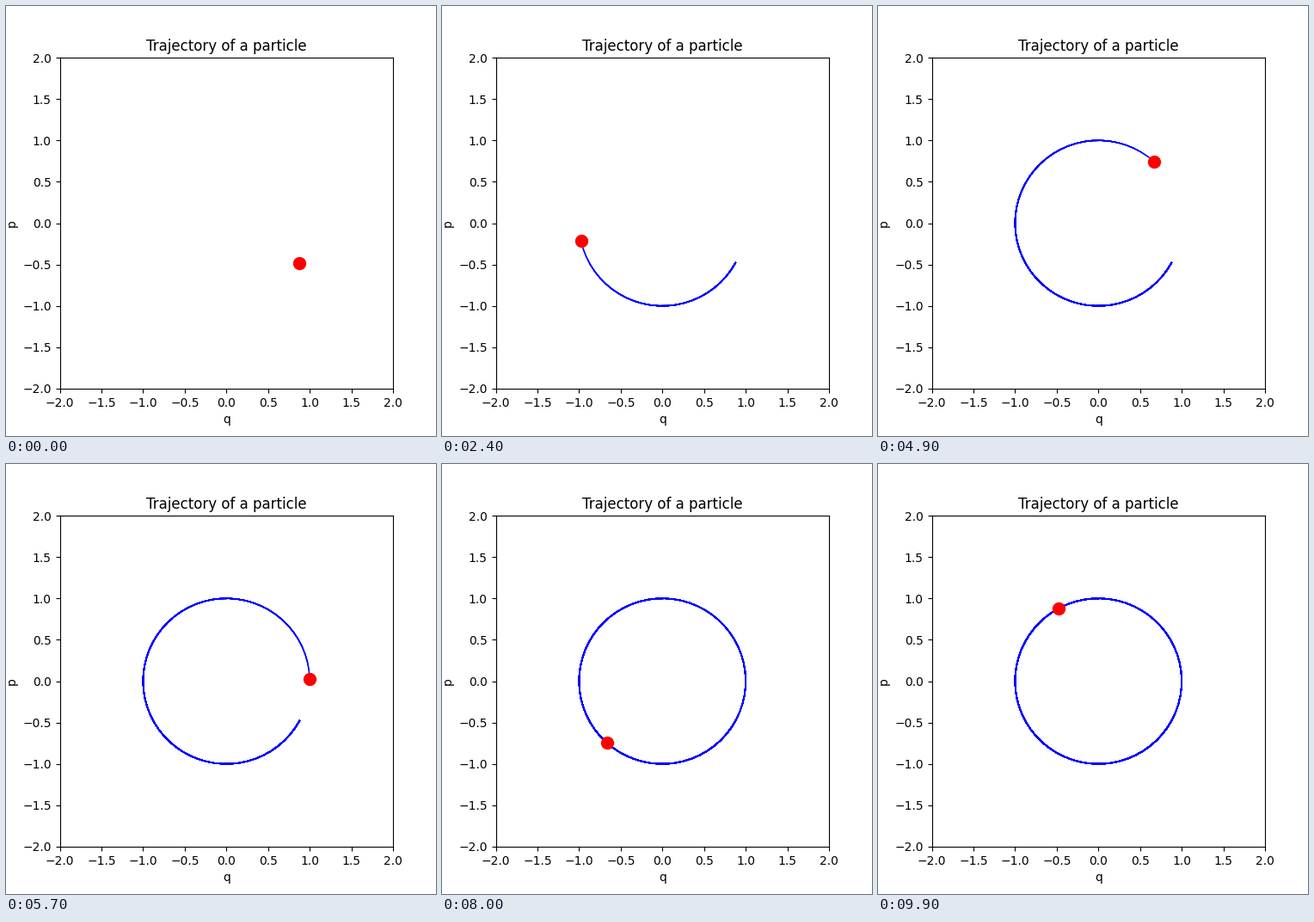
A matplotlib script that plays this animation: 500x500 px, repeating every 10 s.

```python
import numpy as np
import matplotlib.pyplot as plt
from matplotlib.animation import FuncAnimation

FRAMES = 100
INTERVAL = 100

# Unit harmonic oscillator in phase space, starting at phase 0.5
phase = 0.5 + np.linspace(0, 10, FRAMES)
q, p = np.cos(phase), -np.sin(phase)

fig, ax = plt.subplots(figsize=(5, 5), dpi=100)
ax.set(xlim=(-2, 2), ylim=(-2, 2), xlabel="q", ylabel="p",
       title="Trajectory of a particle")

# Each step lays the whole path so far over the earlier ones,
# so the older part of the trail looks heavier.
trails = [ax.plot(q[:i + 1], p[:i + 1], color="blue", lw=1)[0]
          for i in range(FRAMES)]
dot, = ax.plot([], [], "o", color="red", ms=10, zorder=3)


def update(i):
    for k, trail in enumerate(trails):
        trail.set_visible(k <= i)
    dot.set_data([q[i]], [p[i]])
    return [*trails, dot]


anim = FuncAnimation(fig, update, frames=FRAMES, interval=INTERVAL,
                     repeat=True, repeat_delay=0, blit=False)
plt.show()
```
